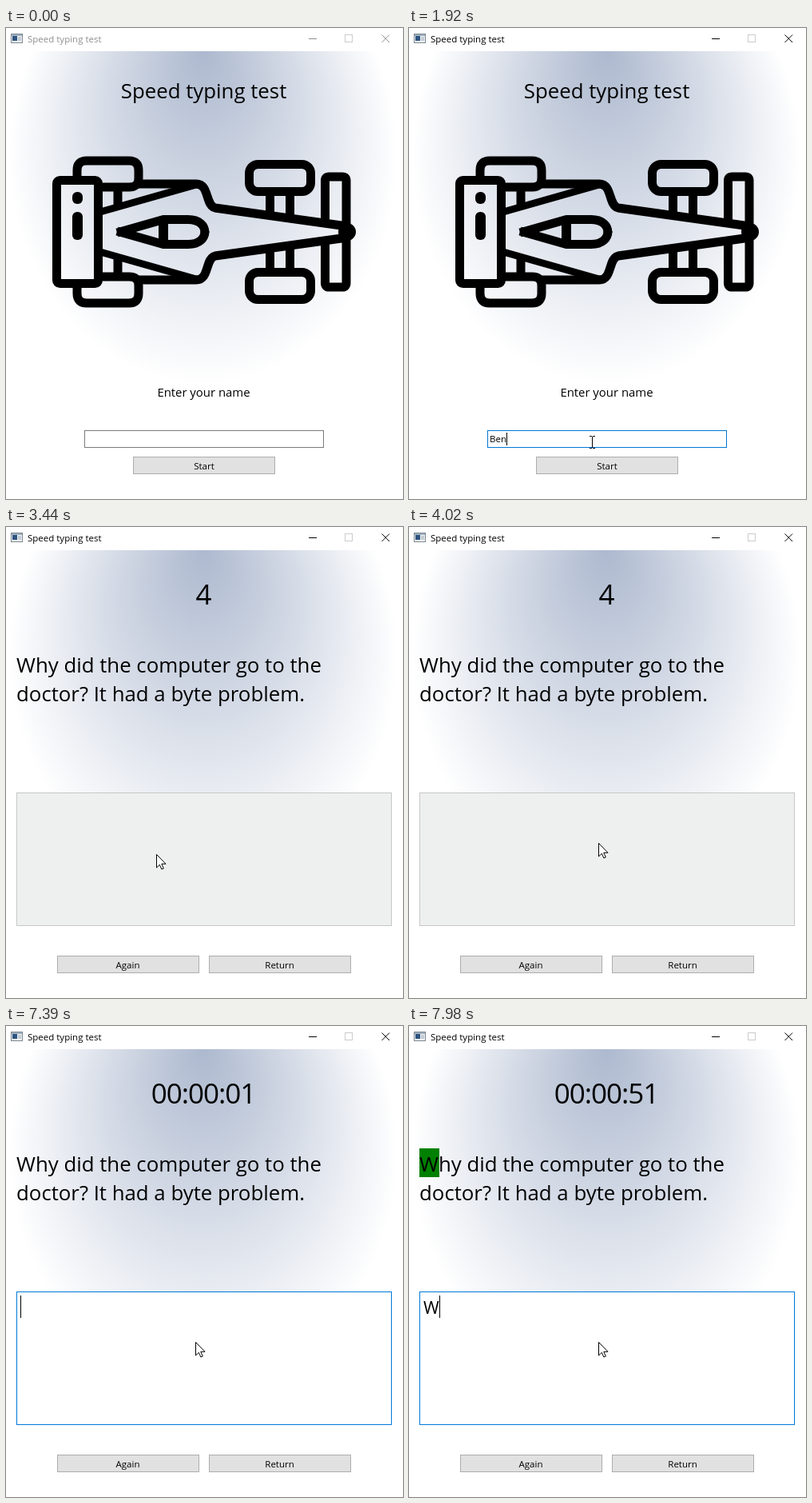
These frames come from a looping animation (497 px wide and 589 px high, 8000 ms). An HTML page:

```html
<!DOCTYPE html>
<html lang="en">
<head>
<meta charset="utf-8">
<title>Speed typing test</title>
<style>
  html, body { margin: 0; width: 100%; height: 100%; overflow: hidden; background: #fff; }
  svg { display: block; width: 100vw; height: 100vh; }
  text { font: 11.5px "Open Sans", "Noto Sans", sans-serif; white-space: pre; }
  .big { font-size: 25.8px; }
  .mid { text-anchor: middle; }
  .box { shape-rendering: crispEdges; }
  .btn { fill: #e1e1e1; stroke: #adadad; }
  .hover { fill: #e5f1fb; stroke: #0078d7; }
  #car { fill: none; stroke: #000; stroke-width: 11; }
</style>
</head>
<body>
<svg viewBox="0 0 497 589">
  <defs>
    <radialGradient id="glow" gradientUnits="userSpaceOnUse" cx="0" cy="0" r="1" fx="0" fy="-.46"
        gradientTransform="matrix(243 0 0 285 247 160)">
      <stop stop-color="#adb9cf"/>
      <stop offset="1" stop-color="#fff"/>
    </radialGradient>
    <g id="half">
      <path d="M89 187V178q0-12 12-12H154q12 0 12 12V188q0 11-12 11H121"/>
      <rect x="304.5" y="170.5" width="77" height="34" rx="11"/>
      <path d="M330.5 205V236M355.5 205V238M140 200V226"/>
      <path d="M166 195H238C255 195 249 222 262 225L427 248"/>
      <path d="M118 230L238 196" stroke-width="9"/>
      <path d="M139 256L197 239.5H228C242 239.5 249 247 249 256" stroke-linejoin="round"/>
      <path d="M399.5 244V191q0-5 5-5H421q5 0 5 5V247"/>
    </g>
  </defs>
  <rect width="497" height="589" fill="#fff"/>
  <rect y="29" width="497" height="560" fill="url(#glow)"/>

  <g class="box">
    <rect x="6.5" y="7.5" width="14" height="11" fill="#eef1f4" stroke="#7d8790"/>
    <path d="M7 8h13v2H7z" fill="#9fb0bf"/>
    <path d="M8 10h6v6H8z" fill="#2f5481"/>
    <path d="M15 11h4v5h-4z" fill="#c3ccd4"/>
  </g>
  <text id="title" x="27" y="18">Speed typing test</text>
  <g id="controls" fill="none">
    <path class="box" d="M379 13.5h10"/>
    <rect class="box" x="424.5" y="8.5" width="9" height="9" stroke="#ccc"/>
    <path d="M470.5 8.5l9.5 9.5m0-9.5l-9.5 9.5"/>
  </g>

  <g id="home">
    <text class="big mid" x="247.5" y="88">Speed typing test</text>
    <g id="car">
      <rect x="63.5" y="190.5" width="52" height="129" rx="4"/>
      <use href="#half"/>
      <use href="#half" transform="matrix(1 0 0 -1 0 510)"/>
      <path d="M197 238V272" stroke-width="12"/>
      <g fill="#000" stroke="none">
        <rect x="83" y="205" width="13" height="15" rx="6"/>
        <rect x="83" y="230" width="13" height="35" rx="6"/>
        <circle cx="427" cy="255" r="11"/>
      </g>
    </g>
    <text class="mid" x="247.5" y="461" style="font-size:14.9px">Enter your name</text>
    <rect id="input" class="box" x="98.5" y="503.5" width="299" height="21" fill="#fff"/>
    <text id="name" x="101" y="518"></text>
    <path id="nameCaret" class="box" stroke="#000"/>
    <rect class="box btn" x="159.5" y="536.5" width="177" height="21"/>
    <rect id="startHover" class="box hover" x="159.5" y="536.5" width="177" height="21"/>
    <text class="mid" x="248" y="552">Start</text>
  </g>

  <g id="game">
    <text id="clock" class="mid" x="247" y="97" style="font-size:35px;letter-spacing:-1px"></text>
    <rect id="mark" class="box" x="13" y="153" width="25" height="36" fill="#008000"/>
    <text class="big" x="13" y="182">Why did the computer go to the</text>
    <text class="big" x="13" y="218">doctor? It had a byte problem.</text>
    <rect id="area" class="box" x="13.5" y="332.5" width="469" height="166"/>
    <text id="typed" x="18" y="360" style="font-size:21.3px"></text>
    <path id="areaCaret" class="box" stroke="#000"/>
    <rect class="box btn" x="64.5" y="536.5" width="177" height="21"/>
    <text class="mid" x="152.5" y="552">Again</text>
    <rect class="box btn" x="254.5" y="536.5" width="177" height="21"/>
    <rect id="returnHover" class="box hover" x="254.5" y="536.5" width="177" height="21"/>
    <text class="mid" x="342.5" y="552">Return</text>
  </g>

  <path id="arrow" d="M.5.5V17L4.3 13.3 6.9 19 9.3 18 6.8 12.3H12z" fill="#fff" stroke="#000"/>
  <path id="beam" class="box" d="M-3-7.5h3m1 0h3M.5-7V7M-3 7.5h3m1 0h3" fill="none" stroke="#000"/>
</svg>
<script>
const LOOP = 8000, CLICK = 840, OPEN = 2350, GO = 7390, TYPE = 7900;
const NAME = 'Bena', KEYS = [1620, 1820, 1900, 1980];
const COUNT = [3440, 4500, 5460, 6430];
// time, x, y of the pointer
const PATH = [
  [170, 262, 588], [430, 244, 552], [600, 227, 525], [660, 223, 521], [980, 223, 521],
  [1020, 229, 518], [2349, 229, 518], [2350, 229, 517], [3200, 229, 517], [3440, 188, 409],
  [3540, 188, 409], [3680, 172, 400], [3860, 222, 397], [4000, 235, 395], [4020, 237, 395]
];
const $ = id => document.getElementById(id);
const set = (id, attrs) => { for (const k in attrs) $(id).setAttribute(k, attrs[k]); };
const show = (id, on) => set(id, { visibility: on ? 'visible' : 'hidden' });
const ramp = (t, a, b) => Math.min(1, Math.max(0, (t - a) / (b - a)));
const two = n => String(n).padStart(2, '0');

function pointer(t) {
  const i = PATH.findIndex(p => p[0] > t);
  if (i < 0) return PATH[PATH.length - 1].slice(1);
  if (i === 0) return [0, 0];
  const [a, b] = [PATH[i - 1], PATH[i]], k = ramp(t, a[0], b[0]);
  return [1, 2].map(n => Math.round(a[n] + (b[n] - a[n]) * k));
}

function clockText(t) {
  if (t < GO) return 5 - COUNT.filter(c => c <= t).length;
  return '00:00:' + two(1 + Math.round((t - GO) / 590 * 50));
}

function draw(t) {
  const active = t >= CLICK, game = t >= OPEN, running = t >= GO;
  set('title', { fill: active ? '#000' : '#8f8f8f' });
  set('controls', { stroke: active ? '#000' : '#8f8f8f' });
  $('home').style.display = game ? 'none' : '';
  $('game').style.display = game ? '' : 'none';

  const [x, y] = pointer(t);
  const inInput = !game && y > 502 && y < 526;
  show('arrow', t >= 170 && !inInput);
  show('beam', t >= 170 && inInput);
  for (const id of ['arrow', 'beam']) set(id, { transform: `translate(${x} ${y})` });

  if (!game) {
    set('input', { stroke: active ? '#0078d7' : inInput ? '#333' : '#7a7a7a' });
    set('startHover', { opacity: ramp(t, 380, 500) * (1 - ramp(t, 560, 760)) });
    const keys = KEYS.filter(k => k <= t).length;
    $('name').textContent = NAME.slice(0, keys);
    const end = 101.5 + Math.round(keys ? $('name').getComputedTextLength() : 0);
    set('nameCaret', { d: `M${end} 506V522` });
    show('nameCaret', active && (t < 1360 || keys));
  } else {
    $('clock').textContent = clockText(t);
    set('returnHover', { opacity: 1 - ramp(t, 2480, 2680) });
    set('area', { fill: running ? '#fff' : '#eef0ef', stroke: running ? '#0078d7' : '#c6c6c6' });
    const typed = t >= TYPE;
    show('mark', typed);
    $('typed').textContent = typed ? 'W' : '';
    set('areaCaret', { d: `M${typed ? 38.5 : 18.5} 337V365` });
    show('areaCaret', running);
  }
}

function tick() {
  draw(performance.now() % LOOP);
  requestAnimationFrame(tick);
}
tick();
</script>
</body>
</html>
```
